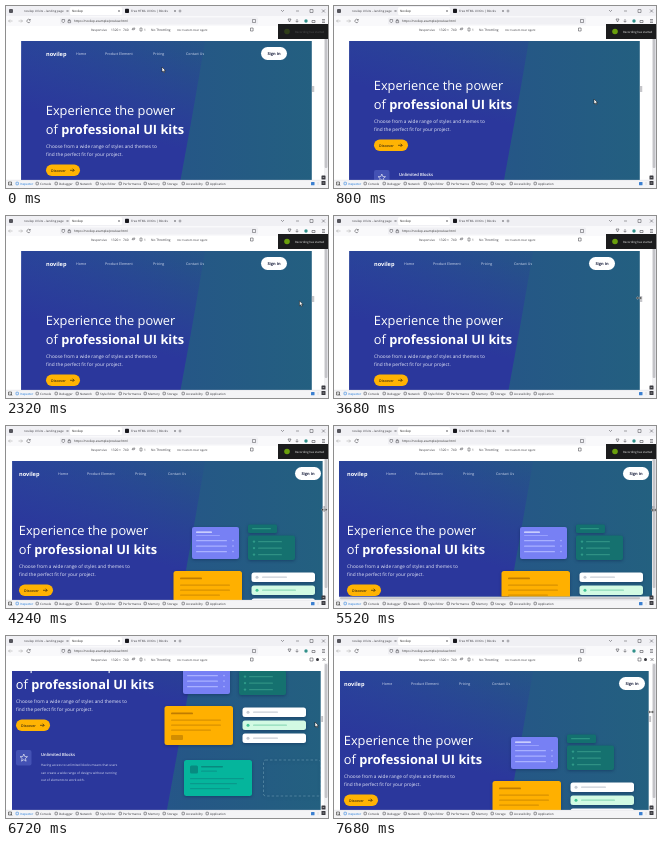
An HTML page that plays this animation: 322 by 182 pixels, repeating every 8000 ms.

```html
<!DOCTYPE html>
<html lang="en">
<head>
<meta charset="utf-8">
<title>Responsive preview</title>
<style>
  html, body { margin: 0; width: 100%; height: 100%; overflow: hidden; background: #fff; }
  svg { display: block; width: 322px; height: 182px; text-rendering: geometricPrecision; }
  text { font-family: "Open Sans", "Noto Sans", sans-serif; white-space: pre; }
  #cards { filter: drop-shadow(0 1.5px 1.5px rgba(10, 25, 70, .4)); }
</style>
</head>
<body>
<svg id="stage" viewBox="0 0 322 182">
  <defs>
    <linearGradient id="sea"><stop stop-color="#294d9a"/><stop offset=".55" stop-color="#255786"/><stop offset="1" stop-color="#23617f"/></linearGradient>
    <linearGradient id="indigo" gradientUnits="userSpaceOnUse" x1="190" y1="25" x2="160" y2="140">
      <stop stop-color="#2b389c" stop-opacity="0"/><stop offset="1" stop-color="#2b379c"/>
    </linearGradient>
    <clipPath id="view"><rect id="viewRect" y="35"/></clipPath>
  </defs>
  <rect width="322" height="182" fill="#fff"/>
  <g id="chrome"></g>
  <g id="overflowBar"></g>
  <g clip-path="url(#view)">
    <g id="page">
      <rect y="30" width="330" height="270" fill="url(#sea)"/>
      <path d="M0 30H200L186 111L158 265H0z" fill="url(#indigo)"/>
      <g id="cards"></g>
      <g id="copy"></g>
      <g id="nav"></g>
      <g id="sign"></g>
    </g>
  </g>
  <path id="grip" d="M0 80v6M1.4 80v6" stroke="#8a8a92" stroke-width=".6"/>
  <g id="tools"></g>
  <g id="notice"></g>
  <g id="cursor">
    <path id="arrow" d="M0 0V5L1.2 4L2 5.8L2.9 5.4L2.1 3.7H3.6z" fill="#fff" stroke="#111" stroke-width=".5"/>
    <path id="resize" d="M-3 0L-1.3 -1.5V-.4H1.3V-1.5L3 0L1.3 1.5V.4H-1.3V1.5z" fill="#222" stroke="#fff" stroke-width=".3"/>
  </g>
</svg>
<script>
const LOOP = 8000;
const $ = id => document.getElementById(id);

function add(parent, tag, attrs, content = '') {
  const node = document.createElementNS('http://www.w3.org/2000/svg', tag);
  for (const key in attrs) node.setAttribute(key, attrs[key]);
  node.textContent = content;
  $(parent).append(node);
  return node;
}
const box = (g, x, y, width, height, fill, rx = 0, more = {}) =>
  add(g, 'rect', { x, y, width, height, fill, rx, ...more });
const dot = (g, cx, cy, r, fill) => add(g, 'circle', { cx, cy, r, fill });
const line = (g, d, stroke, width = .6) =>
  add(g, 'path', { d, stroke, 'stroke-width': width, fill: 'none' });
const label = (g, x, y, size, fill, str, weight = 400, anchor = 'start') =>
  add(g, 'text', { x, y, 'font-size': size, fill, 'font-weight': weight, 'text-anchor': anchor }, str);

function drawChrome() {
  const ink = '#37373d';
  box('chrome', 0, 0, 322, 10, '#f0f0f4');
  box('chrome', 0, 10, 322, 10, '#f9f9fb');
  box('chrome', 64, 1, 52, 8, '#fff', 1.5);
  box('chrome', 3, 3, 4, 4, '#55555c', 1);
  label('chrome', 18, 6.3, 2.95, ink, 'novilep UI kits – landing page');
  label('chrome', 66, 6.3, 3.1, '#222', 'Novilep');
  box('chrome', 119, 2.7, 4, 4.3, '#16161c', .7);
  label('chrome', 125, 6.3, 3, ink, 'Free HTML UI Kits | Blocks');
  line('chrome', 'M60.5 4l2 2m0-2l-2 2M112 4l2 2m0-2l-2 2M168 4l2 2m0-2l-2 2M174 3.5v3m-1.5-1.5h3', ink, .4);
  line('chrome', 'M275 4l1.5 1.5L278 4M290 5h3M304 3.5h3v3h-3zM316 3.5l3 3m0-3l-3 3', ink, .45);
  line('chrome', 'M6.5 15h-4l1.5-1.5m-1.5 1.5l1.5 1.5M12.5 15h4l-1.5-1.5m1.5 1.5l-1.5 1.5', '#999', .5);
  line('chrome', 'M24 14a1.7 1.7 0 1 0 .2 1.6M24.3 13v1.2h-1.2', ink, .5);
  box('chrome', 54, 11.5, 198, 7, '#f0f0f4', 1);
  line('chrome', 'M56 13.5h2.6v2l-1.3 1.4l-1.3-1.4zM62 14.7h2.6v2H62zM62.6 14.7v-1h1.4v1M246.5 13.5h3v3h-3z', ink, .45);
  label('chrome', 68, 16.4, 3.1, '#333', 'https://novilep.example/preview.html');
  line('chrome', 'M282 13l1.5 3l1.5-3zM291 13v3m-1.5-1.2l1.5 1.5l1.5-1.5M306 14.5h3v2h-3zM316 13.5h3m-3 1.5h3m-3 1.5h3', ink, .5);
  dot('chrome', 300, 15, 1.7, '#31908a');

  label('chrome', 85, 24.6, 3, ink, 'Responsive');
  label('chrome', 105, 24.6, 3.2, ink, '1320');
  label('chrome', 113, 24.6, 3.2, ink, '×');
  label('chrome', 117, 24.6, 3.2, ink, '740');
  line('chrome', 'M126 22.4h3l-1-1m1 2h-3l1 1M134 22h2v3h-2z', ink, .45);
  label('chrome', 138, 24.6, 3.2, ink, '1');
  label('chrome', 145, 24.6, 3.2, ink, 'No Throttling');
  label('chrome', 171, 24.6, 2.8, ink, 'UA: Custom User Agent');
  line('chrome', 'M244.5 22h2.6v3h-2.6zM304 22h3v3h-3zM316.5 22l3 3m0-3l-3 3', ink, .5);
  dot('chrome', 311.5, 23.5, 1.5, ink);
  box('chrome', 318, 27, 4, 147, '#f1f1f3');
  box('chrome', 318.7, 28, 2.7, 134, '#c4c4c8', 1);

  box('overflowBar', 5, 170.5, 313, 3.5, '#eeeef0');
  box('overflowBar', 6, 171.2, 300, 2, '#c4c4c8', 1);
}

function drawTools() {
  box('tools', 0, 174, 322, 8, '#f4f4f6');
  line('tools', 'M0 174.2H322', '#d8d8dd', .4);
  line('tools', 'M2.5 176h3v3h-3zM4 177.5l2 2', '#333', .6);
  const tabs = [[10, 'Inspector'], [30, 'Console'], [49, 'Debugger'], [70, 'Network'], [90, 'Style Editor'],
    [113, 'Performance'], [138, 'Memory'], [157, 'Storage'], [176, 'Accessibility'], [200, 'Application']];
  tabs.forEach(([x, name], i) => {
    const ink = i ? '#2c2c32' : '#0a6cd6';
    box('tools', x, 176.2, 2.4, 2.6, 'none', .5, { stroke: ink, 'stroke-width': .5 });
    label('tools', x + 4, 178.8, 3, ink, name);
  });
  box('tools', 305, 176, 3.5, 3.2, '#3b7fd0', .5);
  line('tools', 'M312 176.3v.2m0 1v.2m0 1v.2', '#444', .6);
  box('tools', 315.5, 169.5, 4, 4, '#3a3a40', .6);
  box('tools', 315.5, 175, 4, 4, '#3a3a40', .6);
  line('tools', 'M316.7 171.5h1.6M316.7 177h1.6', '#eee', .5);
}

function drawPage() {
  label('copy', 40, 50.2, 5.6, '#fff', 'novilep', 700);
  [[70, 'Home'], [99, 'Product Element'], [147, 'Pricing'], [180, 'Contact Us']]
    .forEach(([x, name]) => label('nav', x, 49.4, 3.6, '#d3dcf0', name));
  box('sign', 255, 41, 26, 13, '#fff', 6.5);
  label('sign', 268, 49.2, 4, '#1d2340', 'Sign in', 700, 'middle');

  label('copy', 39.8, 108.5, 12.8, '#fff', 'Experience the power');
  const second = label('copy', 39.8, 128.3, 12.8, '#fff', 'of ');
  second.innerHTML += '<tspan font-weight="700">professional UI kits</tspan>';
  label('copy', 40, 142, 4.75, '#e3e6f7', 'Choose from a wide range of styles and themes to');
  label('copy', 40, 149.6, 4.75, '#e3e6f7', 'find the perfect fit for your project.');
  box('copy', 40, 158.5, 34, 11.5, '#ffb303', 5.75);
  label('copy', 45, 165.6, 3.6, '#3b2c10', 'Discover', 600);
  line('copy', 'M64 164.3h4.2m-1.6-1.6l1.6 1.6l-1.6 1.6', '#3b2c10', .7);

  box('copy', 40, 189, 15.5, 15.5, '#4452b4', 2);
  line('copy', 'M47.8 193l1 2.5l2.7.2l-2.1 1.8l.7 2.7l-2.3-1.5l-2.3 1.5l.7-2.7l-2.1-1.8l2.7-.2z', '#fff', .6);
  label('copy', 65, 194.8, 4.2, '#fff', 'Unlimited Blocks', 600);
  ['Having access to unlimited blocks means that users', 'can create a wide range of designs without running',
    'out of elements to work with.']
    .forEach((str, i) => label('copy', 65, 205 + i * 7.5, 3.2, '#d5daf3', str));
}

function drawCards() {
  const bar = (x, y, w, fill, h = 1.3) => box('cards', x, y, w, h, fill, h / 2);

  box('cards', 177, 101, 47, 32, '#7780f4', 2);
  bar(181, 105.5, 16, '#e3e5ff');
  bar(181, 109, 24, '#a4abff', .8);
  [114, 119.5, 125].forEach(y => { bar(181, y, 31, '#a9b0ff'); dot('cards', 218, y + .6, .8, '#a9b0ff'); });

  box('cards', 233, 98.5, 29, 8.5, '#13706f', 1.5);
  bar(237, 102, 19, '#2c9484');
  box('cards', 233, 109.5, 47, 24.5, '#15716f', 2);
  [115, 121.5, 128].forEach(y => { dot('cards', 239, y + .6, 1.2, '#2f9a89'); bar(243, y, 24, '#2f9184'); });

  box('cards', 158.5, 145, 68.5, 39, '#ffb000', 2.5);
  bar(165, 151.5, 22, '#c07c00', 1.8);
  [158.5, 163.5].forEach(y => bar(165, y, 50, '#d99200'));
  bar(165, 168.5, 40, '#d99200');
  box('cards', 165, 174, 12, 5, '#d28d00', 1);

  ['#fff', '#d2fae3', '#fff'].forEach((fill, i) => {
    const y = 146.5 + i * 13;
    box('cards', 236.5, y, 63.5, 9.5, fill, 2.5);
    dot('cards', 242, y + 4.7, 1.5, i === 1 ? '#42c494' : '#c5cad3');
    bar(247, y + 4, i === 1 ? 34 : 25, i === 1 ? '#8fdcb9' : '#c9ced6');
  });

  box('cards', 178, 199, 68, 36, '#05b59c', 2.5);
  box('cards', 184, 204.5, 8, 8, '#078a80', 1.5);
  bar(195, 205, 22, '#08897f', 1.6);
  bar(195, 209.5, 16, '#08998c');
  [217, 222, 227].forEach((y, i) => bar(184, y, 54 - i * 7, '#08998c'));
  box('cards', 257.5, 199, 57, 36, 'none', 2,
    { stroke: '#6b9ab2', 'stroke-width': .6, 'stroke-dasharray': '2.5 2' });
}

function drawNotice() {
  box('notice', 272, 18, 50, 15, '#1b1c1d');
  add('notice', 'g', { id: 'message' });
  dot('message', 281, 25.5, 2.8, '#699f0c');
  label('message', 289, 26.7, 2.9, '#f2f2f2', 'Recording has started');
}

const span = (t, a, b) => Math.min(1, Math.max(0, (t - a) / (b - a)));
const ease = p => p * p * (3 - 2 * p);
const move = (id, x, y = 0) => $(id).setAttribute('transform', `translate(${x} ${y})`);
const show = (id, on) => $(id).setAttribute('display', on ? 'inline' : 'none');

// Eased value through [time, value, value, ...] stops.
function track(stops, t) {
  const i = stops.findIndex(stop => stop[0] > t);
  if (i < 0) return stops.at(-1).slice(1);
  const [from, to] = [stops[i - 1], stops[i]];
  const p = ease(span(t, from[0], to[0]));
  return from.slice(1).map((v, k) => v + (to[k + 1] - v) * p);
}

const scrollStops = [[0, 0], [660, 0], [800, 25], [980, 25], [1260, 75], [1640, 75], [2080, 0],
  [6380, 0], [6720, 75], [6920, 75], [7320, 0]];
const edgeStops = [[0, 15.2, 305.8], [3940, 15.2, 305.8], [4320, 5, 318], [5520, 5, 318], [6080, 6, 314.7]];
const cursorStops = [[0, 156, 61], [40, 156, 61], [560, 260, 93], [2000, 260, 93], [2480, 305, 82],
  [3940, 305, 82], [4320, 320, 84], [5520, 320, 84], [6080, 315, 84], [6320, 315, 84],
  [6480, 309, 86], [7280, 309, 86], [7680, 317, 76]];

function render(t) {
  // The wide layout snaps in at a breakpoint, then follows the last drag.
  const wide = t >= 4140;
  const drag = 1 - ease(span(t, 5520, 6080));
  const overflow = t >= 4300 && drag > .5;

  const [left, right] = track(edgeStops, t);
  const view = $('viewRect');
  view.setAttribute('x', left);
  view.setAttribute('width', right - left);
  view.setAttribute('height', overflow ? 135.5 : 139);
  show('overflowBar', overflow);
  move('grip', right + .5);
  move('page', 0, -track(scrollStops, t)[0]);

  move('copy', wide ? -30 + 3 * drag : 0);
  move('nav', wide ? -22 + 4 * drag : 0);
  move('sign', wide ? 30 + 4 * drag : 0);
  move('cards', 9 * drag);
  show('cards', wide);

  $('message').setAttribute('opacity', .25 + .75 * span(t, 40, 520));
  move('notice', 52 * ease(span(t, 6360, 6600)));

  const resizing = (t > 2400 && t < 6360) || t > 7600;
  move('cursor', ...track(cursorStops, t));
  show('arrow', !resizing);
  show('resize', resizing);
}

drawChrome();
drawTools();
drawPage();
drawCards();
drawNotice();

function tick() {
  render(performance.now() % LOOP);
  requestAnimationFrame(tick);
}
tick();
</script>
</body>
</html>
```
